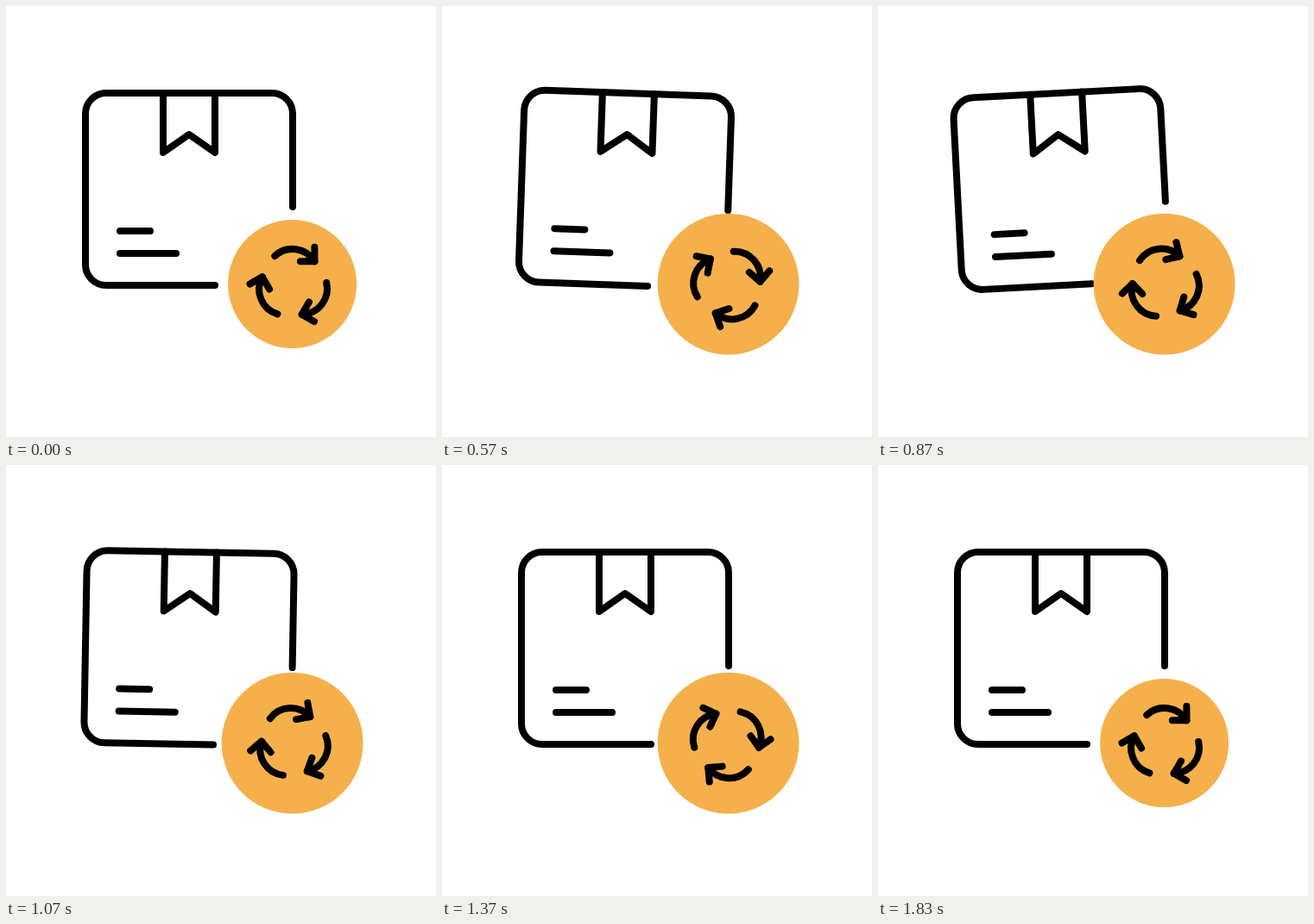
Write an HTML page that moves like this. It is 498 px wide and 500 px high and loops after 2010 ms.

```html
<!DOCTYPE html>
<html lang="en">
<head>
<meta charset="utf-8">
<title>Parcel return</title>
<style>
  html, body { margin: 0; width: 100%; height: 100%; overflow: hidden; background: #fff; }
  svg { display: block; width: 100%; height: 100%; }
  .line { fill: none; stroke: #000; stroke-width: 8; stroke-linecap: round; stroke-linejoin: round; }
</style>
</head>
<body>
<svg viewBox="0 0 498 500">
  <defs>
    <g id="arrow">
      <path d="M-21 -32.8A30 30 0 0 1 25.1 -26.5"/>
      <path d="M25.1 -43V-26.5H8.6"/>
    </g>
  </defs>
  <g id="box" class="line">
    <path d="M332 233V125A24 24 0 0 0 308 101H116A24 24 0 0 0 92 125V300A24 24 0 0 0 116 324H242"/>
    <path d="M182 101V170L212 149L242 170V101"/>
    <path d="M132 261H167M132 287H197"/>
  </g>
  <g transform="translate(331.6 322.6)">
    <circle id="disc" r="74.5" fill="#f6b04b"/>
    <g id="arrows" class="line">
      <g transform="translate(0.7 0.2)">
        <use href="#arrow"/>
        <use href="#arrow" transform="rotate(120)"/>
        <use href="#arrow" transform="rotate(240)"/>
      </g>
    </g>
  </g>
</svg>
<script>
  const LOOP = 2010, FPS = 30;
  const BEAT = 5;      // frames per step of the motion
  const SWINGS = 5;    // steps in the wobble of the box
  const [box, disc, arrows] = ['box', 'disc', 'arrows'].map(id => document.getElementById(id));

  const progress = (x, from, to) => Math.min(1, Math.max(0, (x - from) / (to - from)));

  // Straight swings between +5 and -5 degrees, level before and after
  const pose = i => i > 0 && i < SWINGS ? (i % 2 ? 5 : -5) : 0;
  function tilt(beat) {
    const i = Math.floor(beat);
    return pose(i) + (pose(i + 1) - pose(i)) * (beat - i);
  }

  function draw(ms) {
    // Pictures change on a 10 ms grid, about 30 times a second
    const frame = Math.floor((Math.floor(ms / 10) * 10 + 4) * FPS / 1000);
    const beat = frame / BEAT;
    const grow = progress(beat, 2, 3) - progress(beat, 10, 11);
    const turn = 720 * progress(beat, 3, 10);
    disc.setAttribute('r', 74.5 * (1 + 0.1 * grow));
    arrows.setAttribute('transform', `rotate(${turn})`);
    box.setAttribute('transform', `rotate(${tilt(beat - 3)} 212 212.5)`);
  }

  const start = performance.now();
  function tick() {
    draw((performance.now() - start) % LOOP);
    requestAnimationFrame(tick);
  }
  tick();
</script>
</body>
</html>
```
